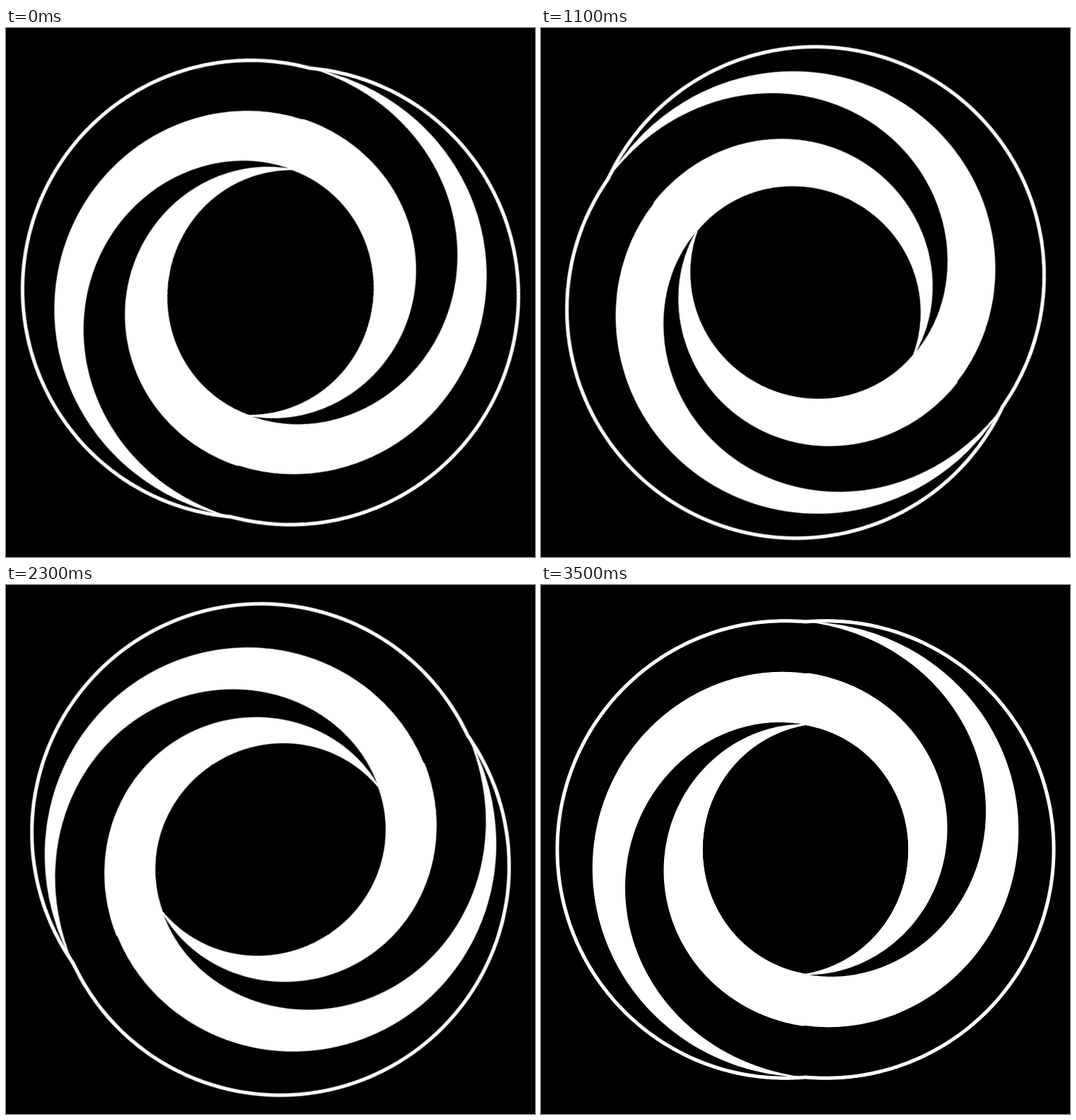
An HTML page for the animation above (3600 ms loop, 748 by 748 pixels).

```html
<!DOCTYPE html>
<html lang="en">
<head>
<meta charset="utf-8">
<title>Spiral</title>
<style>
  html, body { margin: 0; width: 100%; height: 100%; overflow: hidden; background: #000; }
  svg { display: block; width: 100vw; height: 100vh; }
  #spiral { animation: turn 1.8s steps(18, end) infinite; }
  .arm { fill: #fff; }
  .line { fill: none; stroke: #fff; }
  @keyframes turn {
    from { transform: rotate(10deg); }
    to { transform: rotate(190deg); }
  }
</style>
</head>
<body>
<svg viewBox="-374 -374 748 748">
  <g id="spiral">
    <path id="rim" class="line" stroke-width="5"/>
    <path id="hole" class="line" stroke-width="2.4"/>
    <path id="armA" class="arm"/>
    <path id="armB" class="arm" transform="rotate(180)"/>
  </g>
</svg>
<script>
  const { PI, sin, cos, abs } = Math;
  const STEPS = 360;

  // Radii by angle, clockwise from the seam at the top
  const rim = a => 322 + 29 * abs(sin(a));
  const hole = a => 178.3 - 30.5 * abs(sin(a));
  const middle = a => 322 - 146 * a / PI + 4.8 * sin(2 * a);

  // An arm makes one full turn, from the rim seam to the hole seam
  const outer = a => a <= PI
    ? (rim(a) + middle(a)) / 2
    : (middle(a - PI) + hole(a)) / 2;
  const inner = a => a <= PI ? middle(a) : hole(a) - 2.4;

  const trace = radius => Array.from({ length: STEPS + 1 }, (_, i) => {
    const a = 2 * PI * i / STEPS;
    const r = radius(a);
    return (r * sin(a)).toFixed(2) + ',' + (-r * cos(a)).toFixed(2);
  });
  const closed = points => 'M' + points.join('L') + 'Z';
  const draw = (id, d) => document.getElementById(id).setAttribute('d', d);

  const arm = closed([...trace(outer), ...trace(inner).reverse()]);
  draw('rim', closed(trace(rim)));
  draw('hole', closed(trace(a => hole(a) - 1.2)));
  draw('armA', arm);
  draw('armB', arm);
</script>
</body>
</html>
```
